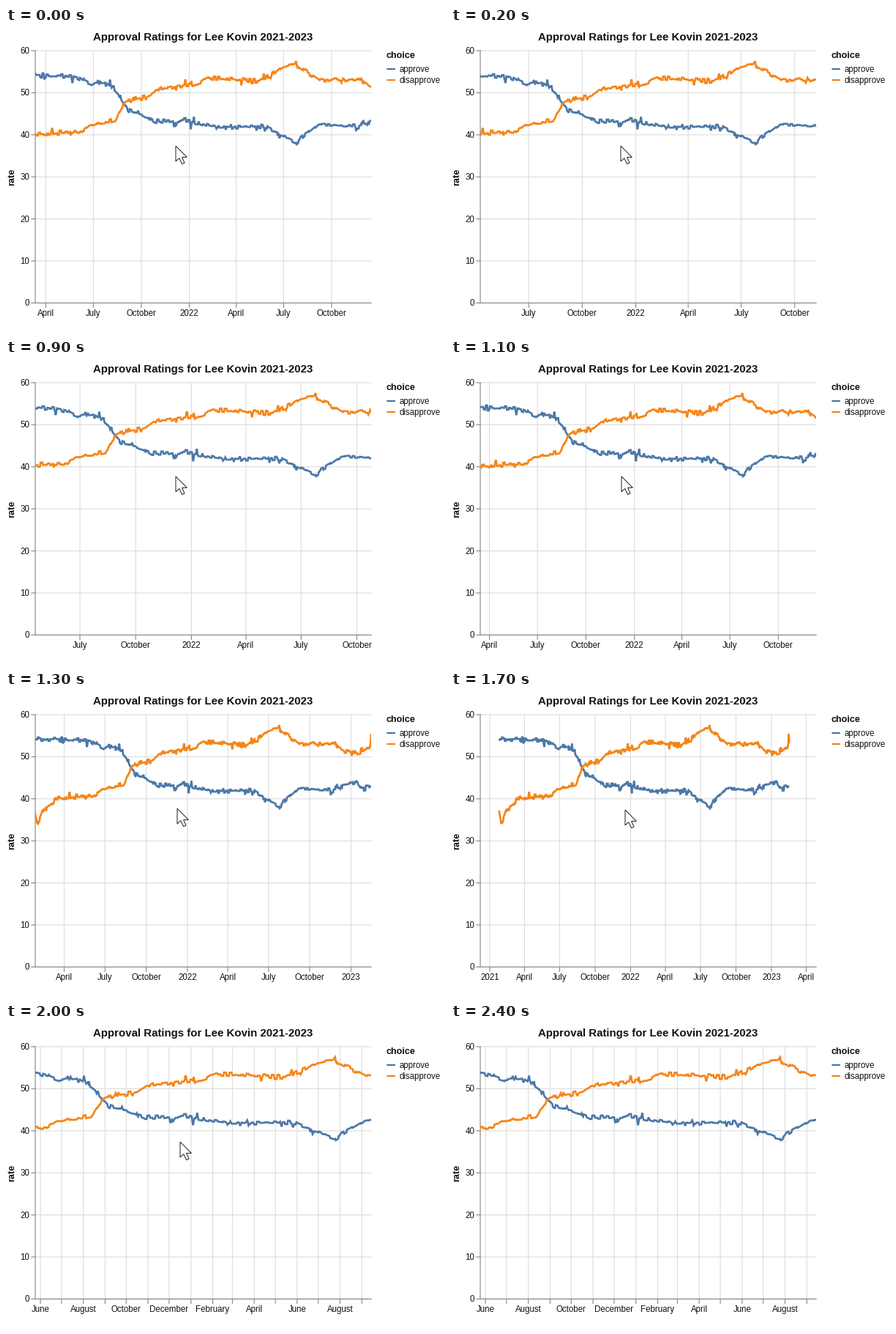
Animation of 600 by 415 pixels, one loop 2600 ms. Source, as a matplotlib script:

```python
import numpy as np
import matplotlib.pyplot as plt
from matplotlib.animation import FuncAnimation
from matplotlib.patches import Polygon, Rectangle

W, H, DPI = 600, 415, 80
PT = 72 / DPI                       # points per pixel
FRAMES, STEP = 26, 100
LEFT, RIGHT, TOP, BOTTOM = 40, 499, 31, 375.4
BLUE, ORANGE, GRID, AXIS = "#4c78a8", "#f58518", "#dddddd", "#888888"

plt.rcParams["font.family"] = "Liberation Sans"
fig = plt.figure(figsize=(W / DPI, H / DPI), dpi=DPI, facecolor="white")
ax = fig.add_axes([0, 0, 1, 1])
ax.set(xlim=(0, W), ylim=(H, 0))
ax.axis("off")


def rate_y(rate):
    return BOTTOM - rate * (BOTTOM - TOP) / 60


def text(x, y, s, px=11.5, **kw):
    return ax.text(x, y, s, fontsize=px * PT, color="#111111", **kw)


def line(x, y, color, px=1.15, **kw):
    return ax.plot(x, y, color=color, lw=px * PT, snap=False, **kw)[0]


# Turning points of each trend: day since 1 January 2021, rate
APPROVE = [(23, 54.2), (143, 54), (178, 52), (204, 52.6), (225, 50.2),
           (247, 46), (300, 43.1), (360, 43.4), (420, 41.7), (505, 42),
           (569, 38.2), (613, 42.5), (683, 42), (742, 44), (752, 42.5),
           (776, 43)]
DISAPPROVE = [(24, 37.4), (30, 34), (42, 37), (70, 39.8), (160, 41),
              (175, 42.2), (224, 43.5), (242, 48), (280, 48.8), (311, 51.2),
              (380, 51.8), (400, 53.4), (500, 52.8), (545, 56), (568, 56.8),
              (615, 53), (695, 53), (715, 51.3), (745, 51.2), (776, 52.3)]


def series(turns, seed, hold=4):
    """Daily values: the trend in held steps plus short tapered spikes."""
    rng = np.random.default_rng(seed)
    day = np.arange(turns[0][0], turns[-1][0] + 1)
    steps = np.repeat(rng.normal(0, 0.25, day.size // hold + 1), hold)
    spikes = (rng.random(day.size) < 0.07) * rng.normal(0, 0.8, day.size)
    spikes = np.convolve(spikes, [0.4, 1, 0.4], "same")
    rate = np.interp(day, *zip(*turns)) + steps[:day.size] + spikes
    return day, rate_y(rate)


# Time, pixels per day, first visible day, pointer x and y
KEYS = np.array([(0, 0.7126, 69.65, 232, 161),
                 (600, 0.9616, 139.6, 232, 161),
                 (900, 0.8282, 107.3, 232, 159),
                 (1300, 0.6125, 25.5, 234, 159),
                 (1700, 0.5274, -24.6, 238, 161),
                 (2000, 0.9613, 143.7, 238, 161)]).T
TIME, SCALE, START, POINT_X, POINT_Y = KEYS
POINTER_END = 2300
ARROW = np.array([(0, 0), (0, 21), (4.8, 16.6), (8.6, 24.6), (12, 23),
                  (8.6, 15.4), (15.4, 15.4)])

months = np.arange("2020-10", "2023-12", dtype="datetime64[M]")
month_day = (months.astype("datetime64[D]")
             - np.datetime64("2021-01-01")).astype(int)
serial = months.astype(int)
NAMES = ("January February March April May June July August September "
         "October November December").split()
month_name = [NAMES[n % 12] if n % 12 else str(1970 + n // 12) for n in serial]

# Fixed parts
for rate in range(0, 61, 10):
    y = rate_y(rate)
    line([LEFT, RIGHT], [y, y], GRID)
    line([LEFT - 5, LEFT], [y, y], AXIS)
    text(32.5, y + 4, str(rate), ha="right")
grid = line([], [], GRID)
ticks = line([], [], AXIS)
labels = [text(0, 393, "", ha="center") for _ in range(20)]
line([LEFT, LEFT], [TOP, BOTTOM], AXIS, zorder=3)
line([LEFT, RIGHT], [BOTTOM, BOTTOM], AXIS, zorder=3)

text(269, 17, "Approval Ratings for Lee Kovin 2021-2023", 15,
     ha="center", weight="bold")
text(8, 203, "rate", 12.6, rotation=90, ha="center", va="center",
     weight="bold")
text(519, 41, "choice", 12.6, weight="bold")
for y, color, name in [(56, BLUE, "approve"), (71, ORANGE, "disapprove")]:
    line([520.5, 532], [y, y], color, 2.3, solid_capstyle="butt")
    text(538, y + 4, name)

plot_area = Rectangle((LEFT, TOP), RIGHT - LEFT, BOTTOM - TOP,
                      transform=ax.transData)
curves = []
for turns, seed, color in [(APPROVE, 4, BLUE), (DISAPPROVE, 9, ORANGE)]:
    day, y = series(turns, seed)
    curve = line(day, y, color, 2.7, solid_joinstyle="miter",
                 solid_capstyle="butt", zorder=4)
    curve.set_clip_path(plot_area)
    curves.append((curve, day))
pointer = ax.add_patch(Polygon(ARROW, closed=True, fc="white", ec="#222222",
                               lw=PT, zorder=6))


def bars(xs, y0, y1):
    """One broken path of vertical segments."""
    return np.repeat(xs, 3), np.tile([y0, y1, np.nan], len(xs))


def draw(i):
    t = i * STEP
    k = np.interp(t, TIME, SCALE)
    # Linear in scale too, so the day under the pointer stays put
    shift = LEFT - np.interp(t, TIME, SCALE * START)
    for curve, day in curves:
        curve.set_xdata(shift + k * day)

    # Quarterly ticks when zoomed out, monthly with alternate labels otherwise
    monthly = (RIGHT - LEFT) / k < 519
    x = shift + k * month_day
    shown = np.flatnonzero((x >= LEFT) & (x <= RIGHT)
                           & (monthly | (serial % 3 == 0)))
    grid.set_data(*bars(x[shown], TOP, BOTTOM))
    ticks.set_data(*bars(x[shown], BOTTOM, BOTTOM + 6))
    named = shown[::2] if monthly else shown
    for label in labels:
        label.set_text("")
    for label, n in zip(labels, named):
        label.set_x(x[n])
        label.set_text(month_name[n])

    tip = np.interp(t, TIME, POINT_X), np.interp(t, TIME, POINT_Y)
    pointer.set_xy(ARROW + tip)
    pointer.set_visible(t < POINTER_END)
    return []


anim = FuncAnimation(fig, draw, frames=FRAMES, interval=STEP, repeat=True)
plt.show()
```
